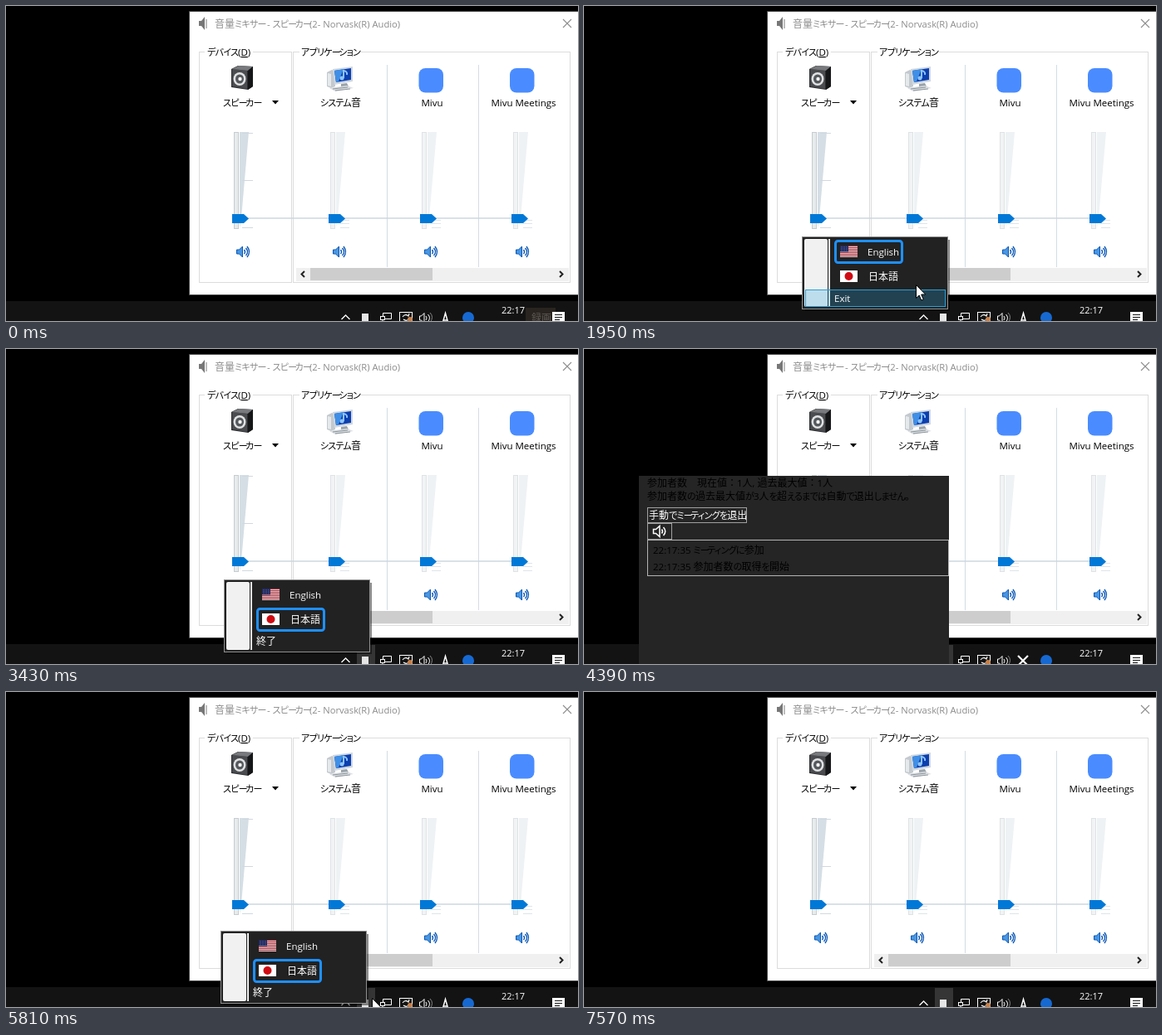
Recreate the animation shown at these times as an HTML page. Size 688x380 px, loop 8 s.

```html
<!DOCTYPE html>
<html lang="ja">
<head>
<meta charset="utf-8">
<title>Volume mixer</title>
<style>
  html, body { margin: 0; width: 100%; height: 100%; overflow: hidden; background: #000; }
  svg { display: block; width: 688px; height: 380px; }
  text { font: 11.5px "Open Sans", "Noto Sans", "Noto Sans CJK JP", sans-serif; white-space: pre; }
  .kana, .long { font: 11px "Noto Sans CJK JP", sans-serif; font-feature-settings: "palt"; letter-spacing: -.7px; }
  .long { letter-spacing: -2.6px; }
  .kanji { font: 12px "Noto Sans CJK JP", sans-serif; }
</style>
</head>
<body>
<svg id="stage" viewBox="0 0 688 380" xmlns="http://www.w3.org/2000/svg"></svg>
<script>
const LOOP = 8000, STEP = 70;
const stage = document.getElementById('stage');

const rect = (x, y, w, h, fill, extra = '') =>
  `<rect x="${x}" y="${y}" width="${w}" height="${h}" fill="${fill}" ${extra}/>`;
const frame = (x, y, w, h, stroke, fill = 'none') =>
  rect(x + .5, y + .5, w - 1, h - 1, fill, `stroke="${stroke}"`);
const path = (d, fill, stroke = 'none', width = 1) =>
  `<path d="${d}" fill="${fill}" stroke="${stroke}" stroke-width="${width}"/>`;
const line = (d, stroke, width = 1) => path(d, 'none', stroke, width);
const disc = (x, y, r, fill) => `<circle cx="${x}" cy="${y}" r="${r}" fill="${fill}"/>`;
const group = (id, body) => `<g id="${id}">${body}</g>`;
const at = (x, y, body) => `<g transform="translate(${x} ${y})">${body}</g>`;

// Kana are set smaller and tighter, as in a Japanese UI font.
const spans = s => s.replace(/[ぁ-ヺ]+|ー|[一-龠：　。]+/g, m => {
  const kind = m === 'ー' ? 'long' : /[ぁ-ヺ]/.test(m) ? 'kana' : 'kanji';
  return `<tspan class="${kind}">${m}</tspan>`;
});
const text = (x, y, s, fill = '#000', extra = '') =>
  `<text x="${x}" y="${y}" fill="${fill}" ${extra}>${spans(s)}</text>`;
const centered = (x, y, s) => text(x, y, s, '#000', 'text-anchor="middle"');

function volumeIcon(x, y) {
  return at(x, y,
    path('M.5 5h3l4-4v13l-4-4h-3z', '#4a97e2', '#0a56b5') +
    line('M9.500 5q2 2.500 0 5M11.500 3q4 4.500 0 9M13 1q5 6.500 0 13', '#0a56b5', 1.400));
}

function outlineVolume(x, y) {
  return at(x, y, path('M.5 5h3l4.500-4v13l-4.500-4h-3z', 'none', '#fff', 1.500) +
    line('M10.500 5q2 2.500 0 5M12.500 2.500q4.500 5 0 10', '#fff', 1.500));
}

function slider(x, main) {
  const ticks = main ? [153, 210, 267] : [258, 262, 267];
  const dx = main ? 12 : 14;
  return frame(x + 2, 152, 6, 117, main ? '#c6cccf' : '#dfe3e5', main ? '#e8ebec' : '#f1f3f4') +
    path(`M${x + 9} 152h11l-9 104l-2 12z`, main ? '#d5dee5' : '#eef2f4') +
    ticks.map(y => line(`M${x + dx} ${y + .5}h${main ? 13 : 11}`, main ? '#cfd9df' : '#dde4e8')).join('') +
    path(`M${x} 251h14l6 5.500l-6 5.500h-14z`, '#0078d7');
}

function speakerBox() {
  return at(271, 71,
    path('M0 5l8-4l18 1v24l-6 4l-20-3z', '#2a2b2d') +
    path('M1 5l18 2v22l-18-3z', '#4a4c4f') + path('M1 5l8-4l17 1l-6 5z', '#77797c') +
    path('M20 7l6-5v24l-6 4z', '#151618') +
    `<ellipse cx="10" cy="17" rx="7.500" ry="8" fill="#dfe1e3"/>
     <ellipse cx="10" cy="17" rx="5" ry="5.500" fill="#55585c"/>` +
    disc(10.500, 17, 2.200, '#f3f3f3'));
}

function computer() {
  return at(386, 73,
    path('M0 7l6-3l4 2v18l-5 2l-5-2z', '#c3c9ce') + path('M1 8l4 1v15l-4-1z', '#e6e9ec') +
    path('M7 3l24-3v18l-22 4z', '#cfd8e0') + path('M9 5l20-3v14l-18 3z', '#0d3fae') +
    path('M9 5l11-2l-6 15l-3 1z', '#3f8fe6') +
    line('M20 4v10M20 5q5 1 4 5', '#8cc4ff', 2) + disc(18, 14, 2.500, '#8cc4ff') +
    path('M17 21l7-1l2 4l-9 1z', '#9aa3aa') +
    path('M3 26l21-3l8 3l-22 4z', '#d9dde1') + line('M7 27l18-2M10 29l18-2', '#8b949b'));
}

function mixer() {
  const apps = [388, 498, 608];
  return rect(220, 6, 468, 343, '#4a4a4a') + rect(221, 7, 467, 341, '#fff') +
    path('M232 18h3l4-5v16l-4-5h-3z', '#777') + line('M241 16v11', '#aaa', 1.500) +
    text(251, 26, '音量ミキサー - スピーカー', '#8b8b8b') +
    text(365, 26, '(2- Norvask(R) Audio)', '#8b8b8b', 'style="font-size:11.2px"') +
    line('M670 16l10 10M680 16l-10 10', '#8e8e8e', 1.100) +
    frame(232, 55, 112, 279, '#dcdcdc') + frame(345, 55, 334, 279, '#dcdcdc') +
    rect(239, 50, 58, 10, '#fff') + rect(353, 50, 74, 10, '#fff') +
    text(242, 60, 'デバイス') +
    `<text x="279" y="60">(<tspan text-decoration="underline">D</tspan>)</text>` +
    text(355, 60, 'アプリケーション') +
    speakerBox() + computer() +
    [496.500, 606].map(x => rect(x, 75, 29.500, 29.500, '#4a8cff', 'rx="8"')).join('') +
    text(261, 121, 'スピーカー') + path('M320 114h8l-4 4.500z', '#000') +
    centered(402.500, 121, 'システム音') + centered(512.500, 121, 'Mivu') + centered(622.500, 121, 'Mivu Meetings') +
    line('M458.500 71v244M568.500 71v244', '#d3dde4') +
    line('M290 256h320', '#cbd7df', 1.500) +
    slider(272, true) + apps.map(x => slider(x, false)).join('') +
    [277, 393, 503, 613].map(x => volumeIcon(x, 289)).join('') +
    rect(349, 316, 328, 16, '#f0f0f0') + rect(366, 316, 147, 15, '#cdcdcd') +
    line('M359 320l-3.500 3.500l3.500 3.500M666 320l3.500 3.500l-3.500 3.500', '#222', 2);
}

function taskbar() {
  return rect(0, 356, 688, 24, '#131313') +
    group('hot', rect(422, 357, 22, 23, '#353535')) +
    group('tip', rect(625, 364, 36, 16, '#29241f') + text(632, 381, '録画', '#5d5853')) +
    line('M403.500 378l5-5l5 5', '#fff', 1.300) +
    rect(428, 371, 8, 9, '#e6e6e6') +
    path('M453.500 370.500h10v7h-10z', 'none', '#fff') +
    frame(450, 374, 6, 5, '#fff', '#131313') + line('M453 379v2M457 380.500h5', '#fff') +
    frame(473, 369, 16, 13, '#fff') +
    line('M477 375q3-4 7-1l1-3M485 377q-3 4-7 1', '#fff', 1.200) + disc(486, 378, 3, '#c9814a') +
    path('M497.500 374h2l3.500-3.500v12l-3.500-3.500h-2z', 'none', '#fff') +
    line('M505 374q2 2 0 5M507.500 372q4 4 0 9', '#fff') + line('M510 370q5 5 0 12', '#888') +
    group('imeOn', line('M525 383l3.500-12.500l3.500 12.500M526 379h5', '#fff', 1.500)) +
    group('imeOff', line('M522 370l12 12M534 370l-12 12', '#fff', 2.200)) +
    disc(556, 376, 7, '#1769d2') +
    text(596, 371, '22:17', '#fff', 'style="font-size:11px"') +
    path('M657 369h15v11h-15z', '#fff') + line('M660 372.500h9M660 375.500h9M660 378.500h6', '#131313');
}

function meeting() {
  return rect(66, 153, 373, 227, '#252525') +
    text(76, 166, '参加者数　現在値：1人, 過去最大値：1人') +
    text(76, 182, '参加者数の過去最大値が3人を超えるまでは自動で退出しません。') +
    frame(76, 191, 120, 19, '#a0a0a0') + text(78, 205, '手動でミーティングを退出', '#fff') +
    frame(76, 210, 30, 20, '#a0a0a0') + outlineVolume(83, 212.500) +
    frame(76, 230, 363, 44, '#b4b4b4') +
    text(83, 247, '22:17:35 ミーティングに参加') +
    text(83, 267, '22:17:35 参加者数の取得を開始');
}

function flags() {
  let us = rect(308, 289, 21, 14, '#e9e4e6');
  for (let i = 0; i < 7; i++) us += rect(308, 289 + i * 2, 21, 1.100, '#b0303c');
  us += rect(308, 289, 10, 7.500, '#22295f');
  for (let i = 0; i < 9; i++) us += rect(309.500 + i % 3 * 3, 290.500 + Math.floor(i / 3) * 2, 1, .7, '#8d94ba');
  return us + rect(308, 319, 21, 14, '#fff') + disc(318.500, 326, 5, '#cf0a12');
}

function hover(id, y, h) {
  return group(id, rect(266, y, 168, h, '#26a0da', 'fill-opacity=".25"') +
    frame(266, y, 169, h, '#26a0da'));
}

function menu() {
  return rect(266, 282, 174, 86, '#000', 'opacity=".45"') +
    frame(262, 278, 176, 88, '#8f8f8f', '#222') +
    rect(265, 281, 28, 82, '#f1f1f1', 'rx="2"') +
    rect(294, 281, 1, 82, '#e2e3e3') + rect(295, 281, 1, 82, '#fff') +
    hover('hoverLang', 281, 60) + hover('hoverExit', 342, 21) +
    group('ring', rect(302.500, 283.500, 80, 26, '#222', 'stroke="#1e90ff" stroke-width="3" rx="3"')) +
    flags() + text(341, 301, 'English', '#fff') + text(342, 331, '日本語', '#fff') +
    group('exitEn', text(301, 357, 'Exit', '#fff')) +
    group('exitJa', text(301, 357, '終了', '#fff'));
}

stage.innerHTML = rect(0, 0, 688, 380, '#000') + mixer() + taskbar() +
  group('meeting', meeting()) + group('menu', menu()) +
  group('cursor', path('M.5 .5v16l3.700-3.500l2.600 6l2.500-1l-2.600-6h5z', '#fff', '#000'));

const el = {};
for (const g of stage.querySelectorAll('g[id]')) el[g.id] = g;
const show = (id, on) => el[id].setAttribute('display', on ? 'inline' : 'none');

// Pointer keys: time, x, y. Values past the bottom edge hide it.
const keys = [
  [0, 470, 390], [460, 470, 390], [530, 456, 372], [670, 433, 361],
  [1130, 433, 361], [1200, 431, 359], [1740, 431, 359], [1880, 415, 347],
  [1950, 399, 336], [2290, 371, 323], [2480, 371, 323], [2550, 367, 323],
  [2880, 367, 323], [3430, 432, 381], [4780, 439, 381], [4990, 439, 375],
  [5740, 439, 375], [5810, 440, 369], [6210, 362, 306], [6350, 362, 306],
  [6880, 436, 381], [LOOP, 436, 381]
];

function pointer(t) {
  const i = Math.max(1, keys.findIndex(k => k[0] > t));
  const [t0, x0, y0] = keys[i - 1], [t1, x1, y1] = keys[i];
  const p = Math.floor((t - t0) / STEP) * STEP / (t1 - t0);
  return [Math.round(x0 + (x1 - x0) * p), Math.round(y0 + (y1 - y0) * p)];
}

const between = (t, a, b) => t >= a && t < b;
// Three-step fade starting at the given time.
const fade = (t, start, step) => t < start ? 0 : Math.min(1, (Math.floor((t - start) / step) + 1) / 3);
const menuAlpha = t => t < 5000
  ? fade(t, 1420, 70) - fade(t, 3760, 50)
  : fade(t, 5590, 70) - fade(t, 7430, 70);

function update(t) {
  const second = t > 5000, dx = second ? -4 : 0, dy = second ? 10 : 0;
  const [x, y] = pointer(t);
  const alpha = menuAlpha(t);
  const japanese = between(t, 2880, 6350);
  const imeOff = between(t, 1200, 1490) || between(t, 3810, 4590) || between(t, 5450, 5660);

  show('tip', t < 70);
  show('hot', between(x, 422, 444) && y >= 357);
  show('imeOff', imeOff);
  show('imeOn', !imeOff);
  show('meeting', between(t, 4390, 5450));

  show('menu', alpha > .01);
  el.menu.setAttribute('opacity', alpha);
  el.menu.setAttribute('transform', `translate(${dx} ${dy})`);
  el.ring.setAttribute('transform', `translate(0 ${japanese ? 30 : 0})`);
  show('exitJa', japanese);
  show('exitEn', !japanese);

  // The hovered row trails the pointer by one step.
  const [px, py] = pointer(Math.max(0, t - STEP));
  const inside = between(px - dx, 266, 435);
  show('hoverLang', inside && between(py - dy, 281, 342));
  show('hoverExit', inside && between(py - dy, 342, 363));

  show('cursor', y < 380);
  el.cursor.setAttribute('transform', `translate(${x} ${y})`);
}

const begin = performance.now();
function tick() {
  update((performance.now() - begin) % LOOP);
  requestAnimationFrame(tick);
}
tick();
</script>
</body>
</html>
```
